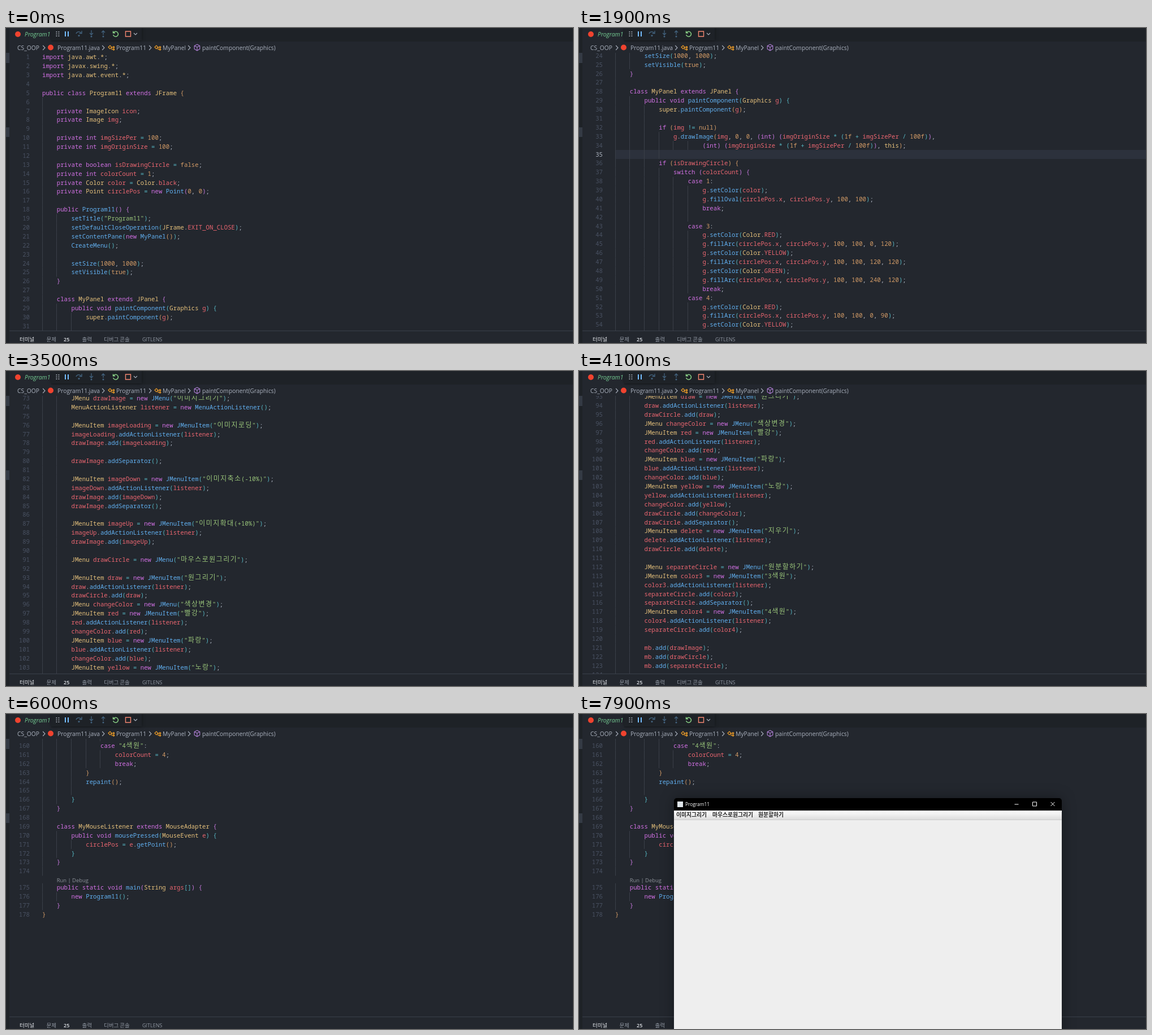
An HTML page with a canvas for the animation above (8 s loop, 1003 by 558 pixels).

```html
<!DOCTYPE html>
<html lang="ko">
<head>
<meta charset="utf-8">
<title>Code scroll</title>
<style>
html, body { margin: 0; width: 100%; height: 100%; overflow: hidden; background: #23272e; }
canvas { display: block; }
</style>
</head>
<body>
<canvas id="stage" width="1003" height="558"></canvas>
<script>
const SOURCE = `import java.awt.*;
import javax.swing.*;
import java.awt.event.*;

public class Program11 extends JFrame {

	private ImageIcon icon;
	private Image img;

	private int imgSizePer = 100;
	private int imgOriginSize = 100;

	private boolean isDrawingCircle = false;
	private int colorCount = 1;
	private Color color = Color.black;
	private Point circlePos = new Point(0, 0);

	public Program11() {
		setTitle("Program11");
		setDefaultCloseOperation(JFrame.EXIT_ON_CLOSE);
		setContentPane(new MyPanel());
		CreateMenu();

		setSize(1000, 1000);
		setVisible(true);
	}

	class MyPanel extends JPanel {
		public void paintComponent(Graphics g) {
			super.paintComponent(g);

			if (img != null)
				g.drawImage(img, 0, 0, (int) (imgOriginSize * (1f + imgSizePer / 100f)),
						(int) (imgOriginSize * (1f + imgSizePer / 100f)), this);

			if (isDrawingCircle) {
				switch (colorCount) {
					case 1:
						g.setColor(color);
						g.fillOval(circlePos.x, circlePos.y, 100, 100);
						break;

					case 3:
						g.setColor(Color.RED);
						g.fillArc(circlePos.x, circlePos.y, 100, 100, 0, 120);
						g.setColor(Color.YELLOW);
						g.fillArc(circlePos.x, circlePos.y, 100, 100, 120, 120);
						g.setColor(Color.GREEN);
						g.fillArc(circlePos.x, circlePos.y, 100, 100, 240, 120);
						break;
					case 4:
						g.setColor(Color.RED);
						g.fillArc(circlePos.x, circlePos.y, 100, 100, 0, 90);
						g.setColor(Color.YELLOW);
						g.fillArc(circlePos.x, circlePos.y, 100, 100, 90, 90);
						g.setColor(Color.GREEN);
						g.fillArc(circlePos.x, circlePos.y, 100, 100, 180, 90);
						g.setColor(Color.BLUE);
						g.fillArc(circlePos.x, circlePos.y, 100, 100, 270, 90);
						break;
				}

			}

			MyMouseListener listener = new MyMouseListener();
			addMouseListener(listener);
			addMouseMotionListener(listener);
		}
	}

	private void CreateMenu() {
		JMenuBar mb = new JMenuBar();
		JMenu drawImage = new JMenu("이미지그리기");
		MenuActionListener listener = new MenuActionListener();

		JMenuItem imageLoading = new JMenuItem("이미지로딩");
		imageLoading.addActionListener(listener);
		drawImage.add(imageLoading);

		drawImage.addSeparator();

		JMenuItem imageDown = new JMenuItem("이미지축소(-10%)");
		imageDown.addActionListener(listener);
		drawImage.add(imageDown);
		drawImage.addSeparator();

		JMenuItem imageUp = new JMenuItem("이미지확대(+10%)");
		imageUp.addActionListener(listener);
		drawImage.add(imageUp);

		JMenu drawCircle = new JMenu("마우스로원그리기");

		JMenuItem draw = new JMenuItem("원그리기");
		draw.addActionListener(listener);
		drawCircle.add(draw);
		JMenu changeColor = new JMenu("색상변경");
		JMenuItem red = new JMenuItem("빨강");
		red.addActionListener(listener);
		changeColor.add(red);
		JMenuItem blue = new JMenuItem("파랑");
		blue.addActionListener(listener);
		changeColor.add(blue);
		JMenuItem yellow = new JMenuItem("노랑");
		yellow.addActionListener(listener);
		changeColor.add(yellow);
		drawCircle.add(changeColor);
		drawCircle.addSeparator();
		JMenuItem delete = new JMenuItem("지우기");
		delete.addActionListener(listener);
		drawCircle.add(delete);

		JMenu separateCircle = new JMenu("원분할하기");
		JMenuItem color3 = new JMenuItem("3색원");
		color3.addActionListener(listener);
		separateCircle.add(color3);
		separateCircle.addSeparator();
		JMenuItem color4 = new JMenuItem("4색원");
		color4.addActionListener(listener);
		separateCircle.add(color4);

		mb.add(drawImage);
		mb.add(drawCircle);
		mb.add(separateCircle);

		setJMenuBar(mb);
	}

	class MenuActionListener implements ActionListener {
		public void actionPerformed(java.awt.event.ActionEvent e) {
			String cmd = e.getActionCommand();
			switch (cmd) {
				case "이미지로딩":
					icon = new ImageIcon("images/image0.png");
					img = icon.getImage();
					break;
				case "이미지축소(-10%)":
					imgSizePer -= 10;
					break;
				case "이미지확대(+10%)":
					imgSizePer += 10;
					break;
				case "원그리기":
					isDrawingCircle = true;
					break;
				case "빨강":
					color = Color.RED;
					break;
				case "파랑":
					color = Color.BLUE;
					break;
				case "노랑":
					color = Color.YELLOW;
					break;
				case "지우기":
					isDrawingCircle = false;
					break;
				case "3색원":
					colorCount = 3;
					break;
				case "4색원":
					colorCount = 4;
					break;
			}
			repaint();

		}
	}

	class MyMouseListener extends MouseAdapter {
		public void mousePressed(MouseEvent e) {
			circlePos = e.getPoint();
		}
	}

	public static void main(String args[]) {
		new Program11();
	}
}`;

const ctx = document.getElementById("stage").getContext("2d");
const W = 1003, H = 558, LOOP = 8000;
const LINE = 15.884, CHAR = 6.435, HANGUL = 12.5, LEFT = 64, TOP = 43.6;
const CLIP_TOP = 44, CLIP_BOTTOM = 536;
const ACTIVE_LINE = 35, LENS_LINE = 175, LENS_HEIGHT = 13.2;

const MONO = '500 10.725px "Noto Sans Mono", monospace';
const KOREAN = '"Noto Sans CJK KR", "Noto Sans CJK", sans-serif';
const ui = size => `${size}px "Open Sans", "Noto Sans", sans-serif`;
const korean = (size, weight = 400) => `${weight} ${size}px ${KOREAN}`;

const C = {
  bg: "#23272e", dark: "#1e2227", text: "#abb2bf", dim: "#495162",
  keyword: "#d070e2", type: "#e5c07b", name: "#ea6670", call: "#61afef",
  number: "#d19a66", string: "#98c379", operator: "#56b6c2", cup: "#f0432f"
};
const BRACKETS = ["#d19a66", "#c678dd", "#56b6c2"];
const KEYWORDS = new Set(("import public private class extends implements static void int boolean " +
  "new if switch case break").split(" "));
const TOKEN = /"[^"]*"|[A-Za-z_]\w*|\d+\w*|[(){}[\]]|[-+*\/=!]+|\s+|./g;

// Wheel gestures: start, number of 100 ms steps, lines scrolled after the first step and after the last.
const GESTURES = [
  [900, 3, 2.5, 10.5], [1400, 3, 13, 20.5], [1900, 3, 23.15, 33.5],
  [2300, 3, 36.5, 46.6], [2800, 3, 49.6, 58.5], [3300, 7, 61, 89.5],
  [4100, 7, 92.38, 124], [5000, 6, 127, 149], [5800, 3, 152, 158.7]
];

function scrollAt(time) {
  let lines = 0;
  for (const [start, steps, first, last] of GESTURES) {
    if (time < start) break;
    const step = Math.min(Math.floor((time - start) / 100), steps - 1);
    lines = first + (last - first) * (step / (steps - 1)) ** 0.85;
  }
  return lines;
}

function tokenColor(token, rest, isImport) {
  if (token[0] === '"') return C.string;
  if (KEYWORDS.has(token)) return C.keyword;
  if (/^(true|false|null|\d.*)$/.test(token)) return C.number;
  if (/^[-+*\/=!]/.test(token)) return isImport ? C.type : C.operator;
  if (!/^\w/.test(token)) return C.text;
  if (rest[0] === "(") return C.call;
  if (isImport || /^(this|super|java|awt|event)$/.test(token)) return C.type;
  return /^[A-Z]/.test(token) && !/^[A-Z_]+$/.test(token) ? C.type : C.name;
}

function parse(source) {
  let depth = 0;
  const lines = source.split("\n").map(raw => {
    const indent = raw.match(/^\t*/)[0].length, body = raw.slice(indent);
    const tokens = [...body.matchAll(TOKEN)].map(({ 0: text, index }) => {
      let color;
      if (/^[({[]$/.test(text)) color = BRACKETS[depth++ % 3];
      else if (/^[)}\]]$/.test(text)) color = BRACKETS[--depth % 3];
      else color = tokenColor(text, body.slice(index + text.length), body.startsWith("import"));
      return { text, color };
    });
    return { indent, tokens, guides: indent, blank: !body };
  });
  lines.forEach((line, i) => {
    if (!line.blank) return;
    const above = lines[i - 1].indent, below = lines[i + 1].indent;
    line.guides = above === below ? above : Math.min(above, below) + 1;
  });
  return lines;
}
const LINES = parse(SOURCE);

function rect(x, y, w, h, color) {
  ctx.fillStyle = color;
  ctx.fillRect(x, y, w, h);
}

function text(str, x, y, font, color, align = "left") {
  ctx.font = font;
  ctx.fillStyle = color;
  ctx.textAlign = align;
  ctx.fillText(str, x, y);
}

function disc(x, y, r, color) {
  ctx.fillStyle = color;
  ctx.beginPath();
  ctx.arc(x, y, r, 0, 7);
  ctx.fill();
}

function stroke(d, x, y, color, width = 1.1) {
  ctx.save();
  ctx.translate(x, y);
  ctx.strokeStyle = color;
  ctx.lineWidth = width;
  ctx.stroke(new Path2D(d));
  ctx.restore();
}

function drawToken(token, x, y) {
  for (const part of token.text.split(/([가-힣])/)) {
    if (/[가-힣]/.test(part)) {
      text(part, x + 0.6, y, korean(12, 300), token.color);
      x += HANGUL;
    } else {
      if (part.trim()) text(part, x, y, MONO, token.color);
      x += part.length * CHAR;
    }
  }
  return x;
}

function drawEditor(time) {
  const scroll = scrollAt(time);
  ctx.save();
  ctx.beginPath();
  ctx.rect(6, CLIP_TOP, W, CLIP_BOTTOM - CLIP_TOP);
  ctx.clip();
  LINES.forEach((line, i) => {
    const number = i + 1;
    const y = TOP + (i - scroll) * LINE + (number >= LENS_LINE ? LENS_HEIGHT : 0);
    if (y < CLIP_TOP - 2 * LINE || y > CLIP_BOTTOM + LINE) return;
    const active = number === ACTIVE_LINE && time >= 1900;
    if (active) rect(LEFT, Math.round(y), W - LEFT, 16, "#2c313c");
    if (number === LENS_LINE) text("Run | Debug", LEFT + 4 * CHAR, y - 1.6, ui(9.4), "#8f949c");
    for (let g = 0; g < line.guides; g++)
      rect(Math.floor(LEFT + g * 4 * CHAR), y, 1, LINE, "#3a3f48");
    const base = y + 11.6;
    text(number, 42, base, MONO, active ? C.text : C.dim, "right");
    let x = LEFT + line.indent * 4 * CHAR;
    for (const token of line.tokens) x = drawToken(token, x, base);
  });
  ctx.restore();
}

function drawClassIcon(x, y) {
  stroke("M-5,-1 L-2,-4 L1,-1 L-2,2 Z M0,-1 H3 M1,-1 V3 H3 M3,-1 l1.5,-1.5 1.5,1.5 -1.5,1.5 Z M3,3 l1.5,-1.5 1.5,1.5 -1.5,1.5 Z",
    x, y, "#ee9d28");
}

function drawChrome() {
  rect(0, 0, W, 24, C.dark);
  rect(6, 0, 74, 24, C.bg);
  disc(21, 11, 5, C.cup);
  ctx.save();
  ctx.beginPath();
  ctx.rect(0, 0, 79, 24);
  ctx.clip();
  text("Program11.java", 33, 15, "italic " + ui(10.4), "#73c991");
  ctx.restore();

  ctx.save();
  ctx.shadowColor = "rgba(0,0,0,.4)";
  ctx.shadowBlur = 6;
  rect(80, -4, 160, 26, C.dark);
  ctx.restore();
  for (let i = 0; i < 6; i++) rect(88.5 + (i % 2) * 4, 6 + (i >> 1) * 3.6, 1.8, 1.8, "#a0a6b0");
  rect(104, 6, 2, 9, "#75beff");
  rect(109, 6, 2, 9, "#75beff");
  const faded = "#43637f";
  stroke("M-5,0 A5,5 0 0 1 4,-1 M5,-5 V-0.5 H0.5", 129, 10, faded, 1.3);
  disc(129, 13.5, 1.6, faded);
  stroke("M0,-6 V2 M-3,-1 L0,2 L3,-1", 151, 10, faded, 1.3);
  disc(151, 15, 1.5, faded);
  stroke("M0,2 V-5 M-3,-2 L0,-5 L3,-2", 172, 10, faded, 1.3);
  disc(172, 15, 1.5, faded);
  stroke("M-3.6,-2.6 A4.5,4.5 0 1 1 -4.4,1.6 M-4.5,-5 V-1.8 H-1", 194, 10.5, "#89d185", 1.5);
  stroke("M-4.5,-4.5 H4.5 V4.5 H-4.5 Z", 216, 10.5, "#f48771", 1.4);
  stroke("M-3,-1.5 L0,1.5 L3,-1.5", 229, 10.5, C.text);

  const crumb = (str, x) => text(str, x, 39, ui(10.3), C.text);
  crumb("CS_OOP", 20);
  crumb("Program11.java", 91);
  crumb("Program11", 195);
  crumb("MyPanel", 277);
  crumb("paintComponent(Graphics)", 347);
  for (const x of [67, 172, 255, 324]) stroke("M-1.8,-4 L2,0 L-1.8,4", x, 35, C.text);
  disc(79, 34.5, 5, C.cup);
  drawClassIcon(186, 35);
  drawClassIcon(268, 35);
  stroke("M0,-5.5 L4.8,-3 V2.6 L0,5.5 L-4.8,2.6 V-3 Z M-4.8,-3 L0,-0.5 L4.8,-3 M0,-0.5 V5.5",
    338, 34.5, "#b180d7");

  rect(0, 24, 6, H, C.dark);
  rect(0, 44, 6, 18, "#343a44");
  rect(0, 176, 6, 17, "#343a44");

  rect(6, 536, W, 1, "#3a3f4a");
  const tab = (str, x, color = "#9097a2") => text(str, x, 554.5, korean(9.5), color);
  tab("터미널", 24, "#e2e5ea");
  tab("문제", 71.5);
  text("25", 102, 554.5, "600 " + ui(9), "#e2e5ea");
  tab("출력", 134.5);
  tab("디버그 콘솔", 173);
  text("GITLENS", 241, 554.5, ui(9), "#9097a2");
}

function drawWindow(time) {
  if (time < 7700) return;
  const step = Math.min(Math.floor((time - 7700) / 100), 2);
  const scale = [0.9, 0.975, 1][step];
  const x = 168, y = 149, w = 686, h = 687, cx = x + w / 2, cy = y + h / 2;
  ctx.save();
  ctx.globalAlpha = [0.4, 0.85, 1][step];
  ctx.translate(cx, cy);
  ctx.scale(scale, scale);
  ctx.translate(-cx, -cy);
  ctx.beginPath();
  ctx.roundRect(x, y, w, h, 5);
  ctx.save();
  ctx.shadowColor = "rgba(0,0,0,.35)";
  ctx.shadowBlur = 24;
  ctx.fillStyle = "#000";
  ctx.fill();
  ctx.restore();
  ctx.clip();
  rect(x, y + 22, w, h, "#eeeeee");
  const shade = ctx.createLinearGradient(0, 171, 0, 188);
  shade.addColorStop(0, "#ffffff");
  shade.addColorStop(1, "#dadada");
  rect(x, 171, w, 17, shade);
  rect(x, 187, w, 1, "#cccccc");

  rect(174, 155, 10, 10, "#dfe5ea");
  text("Program11", 188, 163, ui(8.35), "#ffffff");
  stroke("M-3.5,0.5 H3.5", 774, 159.5, "#fff", 1);
  stroke("M-3.5,-3.5 H3.5 V3.5 H-3.5 Z", 806, 159.5, "#fff", 1);
  stroke("M-3.5,-3.5 L3.5,3.5 M3.5,-3.5 L-3.5,3.5", 838, 159.5, "#fff", 1);
  const menu = (str, left) => text(str, left, 181.6, korean(9.8, 700), "#222");
  menu("이미지그리기", 172);
  menu("마우스로원그리기", 236);
  menu("원분할하기", 317);
  ctx.restore();
}

function frame(now) {
  const time = now % LOOP;
  rect(0, 0, W, H, C.bg);
  drawEditor(time);
  drawChrome();
  drawWindow(time);
  requestAnimationFrame(() => frame(performance.now() - begin));
}
const begin = performance.now();
frame(0);
</script>
</body>
</html>
```
